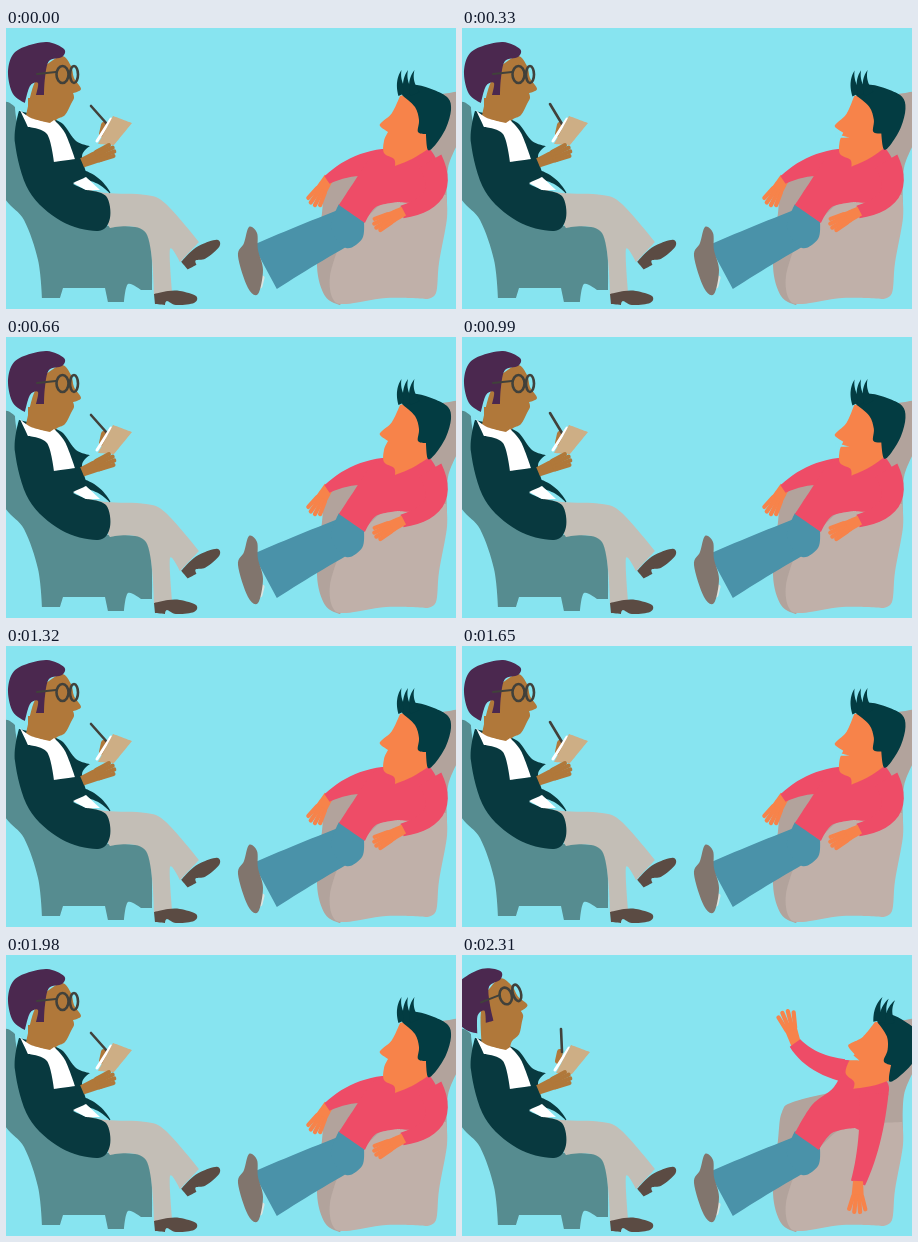
An HTML page with a canvas that plays this animation: 450 px wide and 281 px high, repeating every 3.31 s.

```html
<!DOCTYPE html>
<html lang="en">
<head>
<meta charset="utf-8">
<title>Therapy session</title>
<style>
html, body { margin: 0; width: 100%; height: 100%; overflow: hidden; background: #87e4f0; }
canvas { display: block; width: 100%; height: 100%; }
</style>
</head>
<body>
<canvas id="stage"></canvas>
<script>
const W = 450, H = 281, LOOP = 3310, BEAT = 330, TALK_END = 2310;
const SKY = '#87e4f0', TEAL = '#568c90', NAVY = '#08393f', WHITE = '#ffffff',
  SLACKS = '#c3beb6', SHOE = '#5b4b43', BROWN = '#b0783a', PURPLE = '#4b284f',
  FRAME = '#41413b', PAD = '#cdae85', TAUPE = '#c0b0a9', SHADE = '#b2a39c',
  JEANS = '#4a92a9', BOOT = '#81756d', SOCK = '#dce5e0', PINK = '#ee4c67',
  PEACH = '#f7834a', HAIR = '#033c42';

const canvas = document.getElementById('stage');
const ctx = canvas.getContext('2d');
const scale = window.devicePixelRatio || 1;
canvas.width = Math.round(W * scale);
canvas.height = Math.round(H * scale);

// Closed spline through "x,y" key points; a trailing "!" marks a sharp corner.
function blob(color, text) {
  const pts = text.split(' ').map(p => {
    const [x, y] = p.replace('!', '').split(',').map(Number);
    return { x, y, sharp: p.endsWith('!') };
  });
  const n = pts.length;
  const slope = i => {
    const p = pts[i % n], a = pts[(i + n - 1) % n], b = pts[(i + 1) % n];
    return p.sharp ? [0, 0] : [(b.x - a.x) / 6, (b.y - a.y) / 6];
  };
  ctx.beginPath();
  ctx.moveTo(pts[0].x, pts[0].y);
  pts.forEach((p, i) => {
    const q = pts[(i + 1) % n], [ux, uy] = slope(i), [vx, vy] = slope(i + 1);
    ctx.bezierCurveTo(p.x + ux, p.y + uy, q.x - vx, q.y - vy, q.x, q.y);
  });
  ctx.fillStyle = color;
  ctx.fill();
}

// Bent bar from a to c, pulled towards b, tapering from width w0 to w1.
function limb(color, a, b, c, w0, w1) {
  const steps = 14, near = [], far = [];
  for (let i = 0; i <= steps; i++) {
    const t = i / steps, s = 1 - t;
    const at = k => s * s * a[k] + 2 * s * t * b[k] + t * t * c[k];
    const dir = k => s * (b[k] - a[k]) + t * (c[k] - b[k]);
    const half = (w0 * s + w1 * t) / 2 / Math.hypot(dir(0), dir(1));
    near.push([at(0) - dir(1) * half, at(1) + dir(0) * half]);
    far.unshift([at(0) + dir(1) * half, at(1) - dir(0) * half]);
  }
  ctx.beginPath();
  near.concat(far).forEach(p => ctx.lineTo(...p));
  ctx.fillStyle = color;
  ctx.fill();
}

function line(color, x1, y1, x2, y2, width) {
  ctx.strokeStyle = color;
  ctx.lineWidth = width;
  ctx.beginPath();
  ctx.moveTo(x1, y1);
  ctx.lineTo(x2, y2);
  ctx.stroke();
}

function placed(x, y, angle, paint) {
  ctx.save();
  ctx.translate(x, y);
  ctx.rotate(angle);
  paint();
  ctx.restore();
}

// Turns what is painted in stage coordinates about a pivot.
function tilted(x, y, angle, paint) {
  placed(x, y, angle, () => {
    ctx.translate(-x, -y);
    paint();
  });
}

// Palm and four fanned fingers, starting at the wrist.
function hand(color, x, y, angle, spread, size) {
  placed(x, y, angle, () => {
    limb(color, [-2, 0], [size * 0.3, 0], [size * 0.6, 0], 10, 13);
    for (let i = -1.5; i <= 1.5; i++) {
      const reach = size * (1 - 0.06 * Math.abs(i)), a = i * spread;
      line(color, size * 0.45, i * 3, reach * Math.cos(a), reach * Math.sin(a), 4.2);
    }
  });
}

function shoe(x, y, angle) {
  placed(x, y, angle, () => blob(SHOE, '0,-5! 14,-8 26,-8 42,-3 40,4 22,6 13,2 11,6! 1,5!'));
}

function lens(x, rx) {
  ctx.lineWidth = 2.6;
  ctx.beginPath();
  ctx.ellipse(x, 46.5, rx, 8.5, 0, 0, Math.PI * 2);
  ctx.stroke();
}

function therapistHead() {
  blob(BROWN, '34,42! 55,28 65,38 68,50 75,61 67,65! 68,70 65,76 59,87 50,92 45,101! 20,88! 26,62');
  blob(PURPLE, '2,46 6,28 18,19 41,14 58,21 56,29 43,33 39,50 38,67! 30,67! 32,55 24,58 19,75! 7,66');
  line(FRAME, 31, 46, 50, 44, 2);
  lens(56.5, 6);
  lens(68, 4);
}

function drawTherapist({ gaze, pen, pad }) {
  blob(TEAL, '-5,80 9,79! 16,110 50,180 104,198! 137,200 145,215 146,262! 135,262! 122,256 118,274! 102,274! 99,260! 57,260! 54,270! 36,270! 32,232 18,192 -5,160');
  blob(SLACKS, '78,160! 100,165 140,167 160,176 193,214! 174,234! 164,221 166,263! 148,267! 140,205 104,200!');
  shoe(178, 238, -0.6);
  shoe(148, 271, 0);
  blob(NAVY, '13,83! 9,115 23,163 55,193 92,203 104,190 100,168 80,162! 67,156! 82,149! 76,128 84,118! 70,113 57,96 46,91!');
  limb(NAVY, [78, 147], [94, 151], [104, 165], 9, 1);
  limb(BROWN, [34, 70], [34, 80], [34, 95], 24, 24);
  tilted(30, 90, gaze, therapistHead);
  blob(WHITE, '14,82! 25,90 44,95! 48,92! 59,105 69,131! 48,134! 41,106 22,99!');
  blob(WHITE, '67,155! 80,149! 94,162! 80,162!');
  line(BROWN, 96, 106, 98, 97, 6);
  line(FRAME, ...pen, 2.6);
  placed(pad, pad, 0, () => {
    line(WHITE, 91, 113, 105, 91, 3);
    blob(PAD, '92,116! 107,88! 126,95! 108,117!');
  });
  hand(BROWN, 78, 134, -0.4, 0.13, 33);
}

function relaxedBody() {
  hand(PEACH, 322, 151, 2.12, 0.17, 30);
  limb(PINK, [386, 136], [350, 132], [321, 152], 32, 9);
  blob(PINK, '333,177! 348,154 368,126 388,121! 424,121! 435,145 420,172 392,174! 370,179 359,195!');
  limb(PINK, [424, 133], [446, 172], [396, 184], 26, 13);
  hand(PEACH, 396, 184, 2.67, 0.15, 31);
}

function excitedBody() {
  hand(PEACH, 334, 89, -1.9, 0.17, 35);
  limb(PINK, [390, 117], [350, 111], [333, 88], 24, 13);
  blob(PINK, '333,178! 350,150 372,132 384,108! 420,122! 427,135 414,175 393,173! 370,178 357,195!');
  limb(PINK, [412, 138], [410, 190], [396, 228], 29, 15);
  hand(PEACH, 396, 228, 1.6, 0.2, 30);
}

function patientHead(mouth) {
  blob(PEACH, '394,68! 408,68 421,92 422,121! 406,131 389,138! 388,131 378,125 378,113 382,104! 374,98 376,94 386,85');
  blob(SKY, `374,${107 - mouth}! 388,109! 374,${107 + mouth}!`);
  blob(HAIR, '397,68! 394,58 411,57 428,62 442,70 445,82 440,100 430,116 422,122 420,106! 412,104 413,92 409,79');
  for (let i = 0; i < 3; i++) {
    limb(HAIR, [397 + 6 * i, 66], [391 + 6 * i, 53], [395.5 + 6.5 * i, 42], 10, 0);
  }
}

function drawPatient({ body, tilt, lean, mouth }) {
  blob(SHADE, '436,66! 454,63! 454,112! 442,140 441,180! 334,277! 319,268 311,238 316,185 320,157 334,146 400,130 425,118');
  blob(TAUPE, '334,215! 360,190 385,172 440,167! 441,190 433,235 430,265 420,271! 380,270 340,276 327,271 324,248');
  line(SOCK, 255, 224, 257, 229, 5);
  line(SOCK, 254, 258, 256, 250, 5);
  limb(JEANS, [259, 239], [300, 217], [347, 195], 50, 35);
  blob(JEANS, '333,176! 358,194! 356,211 340,220 325,200');
  blob(BOOT, '243,199 251,205 252,222 257,242 252,266 242,260 232,228 238,215');
  body();
  ctx.save();
  ctx.translate(lean, 0);
  tilted(405, 125, tilt, () => patientHead(mouth));
  ctx.restore();
}

const listen = { gaze: 0, pen: [85, 78, 101, 96], pad: 0, body: relaxedBody, tilt: 0, lean: 0, mouth: 0 };
const speak = { ...listen, pen: [88, 76, 100, 96], tilt: -0.035, mouth: 2 };
const shout = { gaze: -0.274, pen: [99, 74, 100, 97], pad: 2, body: excitedBody, tilt: 0.24, lean: 5, mouth: 5 };

function poseAt(t) {
  if (t >= TALK_END) return shout;
  return Math.floor(t / BEAT) % 2 ? speak : listen;
}

function draw() {
  const pose = poseAt(performance.now() % LOOP);
  ctx.setTransform(canvas.width / W, 0, 0, canvas.height / H, 0, 0);
  ctx.lineCap = 'round';
  ctx.fillStyle = SKY;
  ctx.fillRect(0, 0, W, H);
  drawTherapist(pose);
  drawPatient(pose);
  requestAnimationFrame(draw);
}
draw();
</script>
</body>
</html>
```
